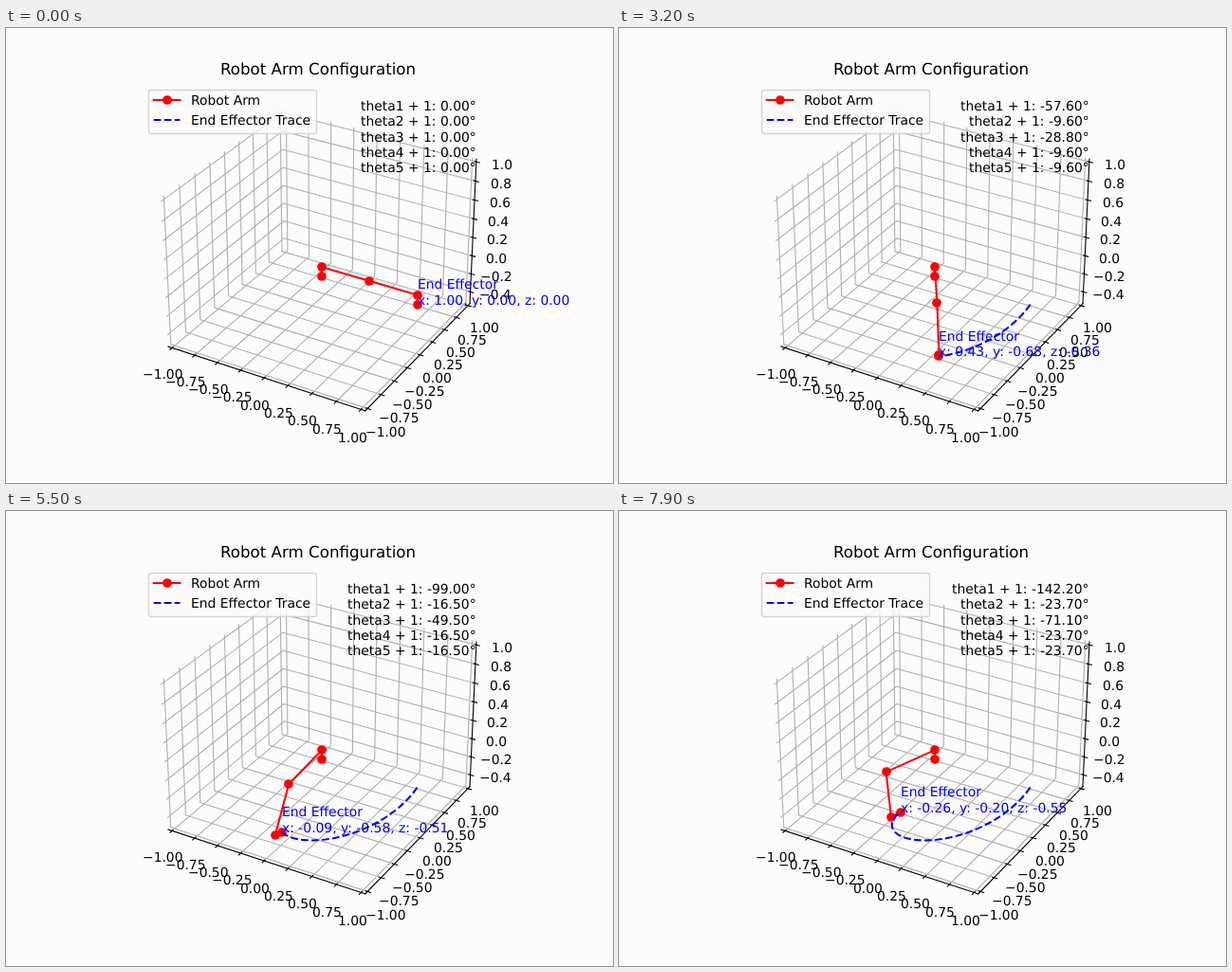
These frames come from a looping animation (640 by 480 pixels, 8 s). An HTML page with a canvas:

```html
<!DOCTYPE html>
<html lang="en">
<head>
<meta charset="utf-8">
<title>Robot Arm Configuration</title>
<style>
  html, body { margin: 0; width: 100%; height: 100%; overflow: hidden; background: #fcfcfc; }
  canvas { display: block; }
</style>
</head>
<body>
<canvas id="stage" width="640" height="480"></canvas>
<script>
const ctx = document.getElementById('stage').getContext('2d');
const STEP = 100, STEPS = 80;
const PT = 100 / 72, FONT = 10 * PT, ASCENT = 11, LINE = 16.2;
const RED = '#ff0000', BLUE = '#0000ff', PAPER = '#fcfcfc';
const rad = deg => deg * Math.PI / 180;

// Perspective camera: elevation 30, azimuth -60, distance 10
const UNIT = 1.8294640721620434 * 2 / Math.sqrt(41);
const ZOOM = 369.6 / 0.185, CX = 143.2 + 0.095 * ZOOM, CY = 427.2 - 0.095 * ZOOM;
const ce = Math.cos(rad(30)), se = Math.sin(rad(30));
const ca = Math.cos(rad(-60)), sa = Math.sin(rad(-60));

function project([x, y, z]) {
  x *= UNIT; y *= UNIT; z = (z - 0.25) * UNIT;
  const depth = 10 - (x * ce * ca + y * ce * sa + z * se);
  const across = -x * sa + y * ca;
  const up = -x * se * ca - y * se * sa + z * ce;
  return [CX + across / depth * ZOOM, CY - up / depth * ZOOM];
}

function stroke(pts, color, width, dash = []) {
  ctx.beginPath();
  for (const [x, y] of pts) ctx.lineTo(x, y);
  ctx.strokeStyle = color;
  ctx.lineWidth = width * PT;
  ctx.lineJoin = 'round';
  ctx.lineCap = dash.length ? 'butt' : 'square';
  ctx.setLineDash(dash.map(d => d * width * PT));
  ctx.stroke();
  ctx.setLineDash([]);
}

const stroke3d = (pts, color, width, dash) => stroke(pts.map(project), color, width, dash);
const DASH = [3.7, 1.6];

function dot([x, y]) {
  ctx.beginPath();
  ctx.arc(Math.round(x), Math.round(y), 3.5 * PT, 0, 2 * Math.PI);
  ctx.fillStyle = RED;
  ctx.fill();
}

// align: 0 left, 0.5 centre, 1 right
function label(str, x, y, align = 0, color = '#000', size = FONT) {
  ctx.font = size + 'px "DejaVu Sans", sans-serif';
  ctx.textAlign = 'left';
  ctx.textBaseline = 'alphabetic';
  ctx.fillStyle = color;
  const m = ctx.measureText(str);
  const w = m.actualBoundingBoxLeft + m.actualBoundingBoxRight;
  ctx.fillText(str, Math.round(x - w * align), Math.round(y));
}

// Axes box, slightly larger than the data limits
const LO = -1 - 1 / 24, HI = 1 + 1 / 24, ZLO = -0.5 - 1 / 32, ZHI = 1 + 1 / 32;
const DELTA = 1 / 6, PAD = 11.5 * 48 / (739.2 * 0.72);
const PADXY = PAD * DELTA, PADZ = PAD / 8;
const IN = 0.1 * DELTA, OUT = 0.2 * DELTA;
const num = (v, digits) => v.toFixed(digits).replace('-', '\u2212');

const ticksXY = Array.from({ length: 9 }, (_, i) => (i - 4) / 4);
const ticksZ = Array.from({ length: 8 }, (_, i) => (i - 2) / 5);

const axes = [
  {
    ticks: ticksXY, digits: 2,
    line: [[LO, LO, ZLO], [HI, LO, ZLO]],
    grid: v => [[v, LO, ZLO], [v, HI, ZLO], [v, HI, ZHI]],
    tick: v => [[v, LO + IN, ZLO], [v, LO - OUT, ZLO]],
    text: v => [v, LO - PADXY, ZLO - PADZ]
  },
  {
    ticks: ticksXY, digits: 2,
    line: [[HI, LO, ZLO], [HI, HI, ZLO]],
    grid: v => [[HI, v, ZLO], [LO, v, ZLO], [LO, v, ZHI]],
    tick: v => [[HI - IN, v, ZLO], [HI + OUT, v, ZLO]],
    text: v => [HI + PADXY, v, ZLO - PADZ]
  },
  {
    ticks: ticksZ, digits: 1,
    line: [[HI, HI, ZLO], [HI, HI, ZHI]],
    grid: v => [[HI, HI, v], [LO, HI, v], [LO, LO, v]],
    tick: v => [[HI - IN, HI, v], [HI + OUT, HI, v]],
    text: v => [HI + PADXY, HI + PADXY, v]
  }
];

function drawAxes() {
  for (const a of axes) for (const v of a.ticks) stroke3d(a.grid(v), '#b0b0b0', 0.8);
  for (const a of axes) {
    stroke3d(a.line, '#000', 0.8);
    for (const v of a.ticks) {
      stroke3d(a.tick(v), '#000', 0.8);
      const [x, y] = project(a.text(v));
      label(num(v, a.digits), x, y + ASCENT, 0.5);
    }
  }
}

function drawLegend() {
  ctx.beginPath();
  ctx.roundRect(150.5, 65.5, 177, 46, 0.2 * FONT);
  ctx.fillStyle = 'rgba(252,252,252,0.8)';
  ctx.fill();
  ctx.strokeStyle = 'rgba(204,204,204,0.8)';
  ctx.lineWidth = PT;
  ctx.stroke();
  stroke([[155.7, 76], [183.5, 76]], RED, 1.5);
  dot([169.6, 76]);
  stroke([[155.7, 97], [183.5, 97]], BLUE, 1.5, DASH);
  label('Robot Arm', 194.6, 81);
  label('End Effector Trace', 194.6, 102);
}

// Joint angles in degrees after k steps
const angles = k => [1.8, 0.3, 0.9, 0.3, 0.3].map(rate => -rate * k);

function joints(k) {
  const [yaw, shoulder, elbow, wrist] = angles(k).map(rad);
  const fore = shoulder + elbow, hand = fore + wrist;
  const at = (r, z) => [r * Math.cos(yaw), r * Math.sin(yaw), z];
  const r1 = 0.5 * Math.cos(shoulder), z1 = 0.1 + 0.5 * Math.sin(shoulder);
  const r2 = r1 + 0.5 * Math.cos(fore), z2 = z1 + 0.5 * Math.sin(fore);
  return [
    [0, 0, 0], [0, 0, 0.1], at(r1, z1), at(r2, z2),
    at(r2 + 0.1 * Math.sin(hand), z2 - 0.1 * Math.cos(hand))
  ];
}

const trace = Array.from({ length: STEPS }, (_, k) => joints(k)[4]);

function draw(k) {
  ctx.fillStyle = PAPER;
  ctx.fillRect(0, 0, 640, 480);
  drawAxes();

  const arm = joints(k), tip = arm[4];
  stroke3d(arm, RED, 1.5);
  arm.map(project).forEach(dot);
  if (k) stroke3d(trace.slice(0, k + 1), BLUE, 1.5, DASH);

  angles(k).forEach((a, i) =>
    label(`theta${i + 1} + 1: ${a.toFixed(2)}°`, 494.32, 76.1 + ASCENT + i * LINE, 1));

  const [x, y] = project(tip);
  const [px, py, pz] = tip.map(v => v.toFixed(2));
  label('End Effector', x, y - LINE, 0, BLUE);
  label(`x: ${px}, y: ${py}, z: ${pz}`, x, y, 0, BLUE);

  label('Robot Arm Configuration', 328, 49.27, 0.5, '#000', 12 * PT);
  drawLegend();
}

ctx.textRendering = 'geometricPrecision';
const start = performance.now();
let shown = -1;

function loop() {
  const k = Math.floor((performance.now() - start) / STEP) % STEPS;
  if (k !== shown) draw(shown = k);
  requestAnimationFrame(loop);
}
loop();
</script>
</body>
</html>
```
